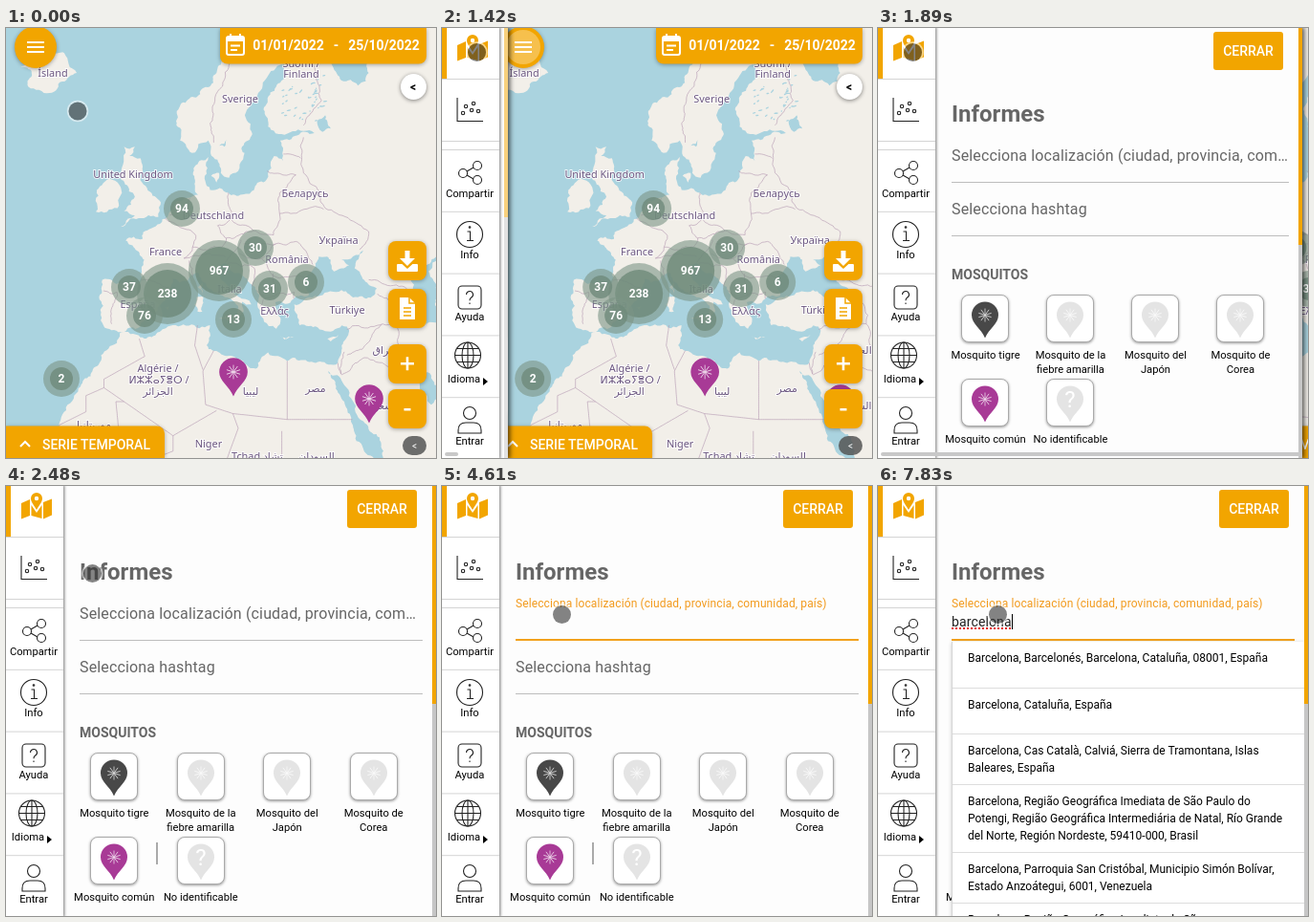
Animation, 450 px wide and 450 px high, one loop 8 s. Source, as an HTML page:

```html
<!DOCTYPE html>
<html lang="es">
<head>
<meta charset="utf-8">
<style>
html, body { margin: 0; width: 100%; height: 100%; overflow: hidden; }
body { position: relative; background: #aad3df; font-family: Roboto, sans-serif; }
div, i, span.abs { position: absolute; box-sizing: border-box; }
svg { display: block; }
svg text { text-anchor: middle; dominant-baseline: central; }
#map, #side svg { position: absolute; left: 0; top: 0; }
.place { font: 10.9px "Noto Sans", "DejaVu Sans", sans-serif; fill: #6b5680; stroke: #fffc; stroke-width: 2px; paint-order: stroke; }
.btn { fill: #f2a500; filter: drop-shadow(0 1px 2px #0005); }
.bold { font-weight: 500; font-size: 14px; fill: #fff; }
.date { font-weight: 700; }
#panel { left: 0; top: 0; height: 450px; overflow: hidden; background: #fdfdfd; color: #666; }
#shade { left: 0; top: 0; height: 450px; box-shadow: 1px 0 5px 1px #000a; }
#side { top: 0; width: 60px; height: 450px; background: #fff; box-shadow: 0 0 3px 1px #0008; }
#side text { font-size: 11.2px; fill: #000; }
#close { top: 4px; width: 73px; height: 40px; border-radius: 3px; background: #f2a500; color: #fff; font: 500 14px/40px Roboto, sans-serif; text-align: center; }
.label { left: 77px; height: 20px; font-size: 16px; line-height: 20px; letter-spacing: .00937em; white-space: nowrap; overflow: hidden; text-overflow: ellipsis; transform-origin: 0 50%; }
.rule { left: 77px; height: 1px; background: #bdbdbd; }
#focus { left: 77px; top: 160px; height: 2px; background: #f2a11c; }
#entry { left: 77px; top: 134px; height: 16px; display: flex; color: #222; font-size: 14px; line-height: 17px; letter-spacing: .12px; }
#caret { position: static; width: 1px; height: 16px; background: #000; }
#grid { left: 68px; top: 279px; display: flex; flex-wrap: wrap; }
.kind { position: static; width: 25%; padding: 0 1.5px 1.6px; font-size: 11.2px; line-height: 15px; text-align: center; color: #000; }
.card { position: static; width: 50px; height: 50px; margin: 0 auto 6px; border: 1px solid #aaa; border-radius: 8px; background: #fff; box-shadow: 0 1px 3px #0006; }
#split { left: 157px; top: 373px; width: 1.5px; height: 23px; background: #aaa; }
#menu { left: 77px; top: 163px; width: 369px; background: #fff; border-left: 1px solid #d5d5d5; box-shadow: 0 1px 4px #0003; }
#menu div { position: static; min-height: 48.6px; padding: 8px 16px; border-bottom: 1px solid #ddd; font-size: 12px; line-height: 18px; color: #000; white-space: pre; }
#track { top: 0; width: 4px; height: 450px; background: #c6c6c6; }
#thumb { width: 4px; background: #f2a500; }
#bar { left: 3px; top: 444px; height: 4px; background: #c8c8c8; border-radius: 2px; }
#cursor { left: -9.5px; top: -9.5px; width: 19px; height: 19px; border-radius: 50%; background: rgba(50, 50, 50, .6); box-shadow: 0 0 0 1.7px #fff8; }
</style>
</head>
<body>
<svg id="map" width="450" height="450"></svg>
<div id="shade"></div>
<div id="panel">
  <span class="abs" style="left:77px;top:76px;font:700 24px/28px Roboto,sans-serif">Informes</span>
  <div id="close">CERRAR</div>
  <div class="label" id="where" style="top:124px">Selecciona localización (ciudad, provincia, comunidad, país)</div>
  <div class="rule" style="top:161px"></div>
  <div id="focus"></div>
  <div id="entry"><span id="typed"></span><i id="caret"></i></div>
  <div class="label" style="top:180px">Selecciona hashtag</div>
  <div class="rule" style="top:217px"></div>
  <span class="abs" style="left:77px;top:249px;font:700 14px/18px Roboto,sans-serif">MOSQUITOS</span>
  <div id="grid"></div>
  <div id="split"></div>
  <div id="menu"></div>
  <div id="track"><div id="thumb"></div></div>
  <div id="side"></div>
  <div id="bar"></div>
</div>
<div id="cursor"></div>
<script>
const $ = id => document.getElementById(id);
let seed = 11;
const rand = () => (seed = seed * 16807 % 2147483647) / 2147483647;

// Mercator: "lon,lat" to stage pixels
const project = p => {
  const [lon, lat] = p.split(',').map(Number);
  return [152 + 5.69 * lon, 538 - 325.95 * Math.log(Math.tan(Math.PI / 4 + lat * Math.PI / 360))];
};
// midpoint displacement turns a few key points into a natural outline
const rough = (a, b, k) => {
  const dx = b[0] - a[0], dy = b[1] - a[1], len = Math.hypot(dx, dy);
  if (len < 3.5) return [b];
  const d = (rand() - .5) * k * Math.min(1, 20 / len);
  const m = [(a[0] + b[0]) / 2 - dy * d, (a[1] + b[1]) / 2 + dx * d];
  return [...rough(a, m, k), ...rough(m, b, k)];
};
const trace = (s, k, closed) => {
  const pts = s.split(' ').map(project);
  const from = closed ? pts : pts.slice(0, -1);
  const out = from.flatMap((p, i) => rough(p, pts[(i + 1) % pts.length], k));
  return 'M' + [pts[0], ...out].map(p => p.map(v => v.toFixed(1)).join(' ')).join('L') + (closed ? 'Z' : '');
};
const areas = list => list.map(s => trace(s, .42, true)).join('');
const borders = list => list.map(s => trace(s, .3)).join('');

const mainland = [
  '14,70 15,68.3 12,65 9,63.3 5,62 5.3,59.2 7.5,58 10.5,59.2 12.8,56 14.3,55.5 16,56.2 16.7,58.6 18.6,59.8 17.2,61.5 21.5,64.8 24.5,65.8 25,64.8 21.4,62.8 22,60.2 30,59.9',
  '23.7,59.2 24.3,57.2 22.6,57.7 21.2,55.3 19,54.4 14.2,53.9 10.8,54.2 9.8,55.4 10.5,57.6 8.2,56.8 8.6,53.7',
  '4.8,53 3,51.2 1.6,50.4 -1.5,49.4 -1.6,48.6 -4.7,48.4 -1.3,46 -1.8,43.4 -9,43.4 -9.3,38.5 -8.8,37 -5.6,36',
  '-2,36.8 0,38.7 3.2,42 4,43.5 6.5,43.2 8.7,44.3 12.3,41.7 15.6,40 15.8,38 17,39 16.7,40.4 18.4,40 14,42.6 12.4,45.2 13.6,45.6 15,44.4 19.4,41.9 19.5,40 21.6,36.9 23,36.5 23.8,38 22.8,40.3 26.2,40.8',
  '28.9,41.2 27.8,43 30.8,46.4 33,46 33.6,44.5 36.4,45.3 35,46 39,47.2 37.4,44.9 41.5,42.2 41,41.3 38,41 35,42 31,41.2 29.2,41 26.3,40',
  '27.3,37 30.6,36.7 32.5,36.1 36,36.8 35,33 34.3,31.3 31,31.5 25,31.6 21.5,32.9 19.5,30.5 15.3,32.2 10.2,34',
  '10.8,37 3,36.8 -2,35.2 -5.8,35.8 -9.7,31 -13,27.5 -17,21 -16.2,14 60,14 60,70'].join(' ');
const britain = '-5.6,50.1 1.3,51.2 1.7,52.6 -.2,54 -2,55.8 -2,57.5 -4,57.7 -3,58.6 -5,58.6 -5.5,56.3 -4.8,54.8 -3,53.5 -5,51.9 -3,51.4';
const ireland = '-6.2,52.2 -5.6,54.5 -7.2,55.3 -10,54.2 -10.2,51.8';
const iceland = '-24,65.5 -22.3,66.4 -20.8,65.8 -16,66.5 -13.7,65 -18.7,63.4 -22.6,63.9 -22,65';
const islands = ['12.5,38 15.6,38.2 15.1,36.7', '8.3,41 9.6,41 9.4,39 8.5,39', '8.6,42.4 9.4,43 9.4,41.5', '23.6,35.4 26.2,35.2 24.5,34.9',
  '32.4,35 34.5,35.6 33,34.6', '11,55.7 12.5,56 12,55', '2.4,39.6 3.4,39.7 3,39.3'];
const waters = ['32.5,30 35.5,25 37.3,20 41,14 43,14 42.7,16.5 39,21.7 35,28.5', '47.5,45 53,46.5 51,44.5 54,37 50.5,37 49.5,40.5',
  '48,30 50,30 55,26.5 51.5,24.5', '33,66.8 35,64.4 38,64 40,65 39.5,66', '30.5,61 32,61.5 33,60.3 31.5,60', '12.5,58.7 14,59.3 13.5,58.6'];
const europe = ['11.5,59 12.2,63.5 16,67.5 18,68.5', '24.3,65.8 23.7,67.8 21,69', '28,60.6 31.3,62.8 29,67', '28,59.5 28,56 31,54 32,52.2 40,49.5 38.3,47.3',
  '21.3,56.2 26.6,55.8 23.6,53.9 23.6,51.6 31.7,52.1', '24.3,57.9 27.5,57.5', '14.2,53.9 14.7,51 18.8,49.6 22.5,49.1 23.6,51.6', '14.7,51 12.2,50.2 13.8,48.7 18.8,49.6',
  '2.5,51.1 8.2,49 7.6,47.6 13,47.6 13.8,48.7', '3.4,51.4 6,50.9 7.1,53.3', '7.6,47.6 6,46.2 10.4,46.8 13.6,46.4', '7,45.9 7.6,43.8', '-1.8,43.3 3.2,42.4', '-8.8,41.9 -6.3,41.7 -7.3,37.2'];
const east = ['13.6,45.7 16.5,48.5', '17,48 22.9,48 20.3,46.2 22.9,43.8 28.6,43.7', '22.9,48 26.6,48.3 29.7,45.4', '16.2,46.8 20.3,46.2', '14,45.5 19,44.9 18.5,42.5',
  '19.4,41.9 20.9,40.9 20,39.7', '20.9,40.9 26.3,41.7 26.2,40.8', '22.4,44.2 23,41.3', '41.6,41.5 44.5,39.7 44.8,37.2 36,36.4', '40,43.4 48,41.8',
  '42.4,37.1 38.8,33.4 36,32.5', '35,29.4 39.2,32.1 47.5,29', '44.8,37.2 45.5,34 48.5,30', '34.3,31.3 34.9,29.5 35.5,33'];
const sahara = ['25,31.6 25,22 37,22', '25,22 15,23 10,24.5 9.5,30 11.5,33.2', '8.5,37 8,34 9.5,30.2', '12,23.5 4,19.2 -5,25 -8.7,27.3 -8.7,28.7 -1.2,32.3 -2.2,35',
  '-5,25 -6.5,25 -5.5,15.5 -12,15', '4,19.2 4,16.5 0,15', '15,23 16,20.5 13.5,14', '24,20 24,15.7 22,13', '-8.7,27.3 -12,26 -12,23.3 -17,21'];

const places = [['Ísland', 49, 48], ['Sverige', 245, 75], ['Suomi /', 309, 38], ['Finland', 309, 49], ['United Kingdom', 133, 154], ['Беларусь', 313, 174],
  ['Deutschland', 217, 197], ['France', 167, 235], ['Україна', 348, 223], ['România', 294, 243], ['Italia', 234, 274], ['España', 138, 290],
  ['Ελλάς', 281, 297], ['Türkiye', 357, 296], ['Algérie /', 159, 357], ['ⵍⵣⵣⴰⵢⴻⵔ /', 160, 369], ['الجزائر', 159, 381], ['ليبيا', 256, 381], ['مصر', 324, 378],
  ['العراق', 398, 338], ['السعودية', 392, 396], ['Niger', 212, 436], ['Tchad تشاد', 263, 449], ['السودان', 325, 449], ['موريتانيا', 92, 416]];
const clusters = [[94, 184, 189], [30, 261, 230], [967, 223, 254], [238, 169, 278], [37, 129, 271], [76, 145, 301], [31, 276, 273], [6, 314, 266], [13, 238, 305], [2, 58, 367]];

const PURPLE = '#a83a96', PALE = '#e4e4e4';
const times = (n, f) => Array.from({ length: n }, (_, i) => f(i)).join('');
const text = (s, x, y, attrs = '') => `<text x="${x}" y="${y}" ${attrs}>${s}</text>`;
const circle = (x, y, r, attrs = '') => `<circle cx="${x}" cy="${y}" r="${r}" ${attrs}/>`;
const bug = `<g stroke="#fff" stroke-width=".8" opacity=".8">${times(5, i => `<path d="M0-7V7" transform="rotate(${36 * i})"/>`)}</g>`;
const pin = (x, y, color, mark = bug, k = 1) => `<g transform="translate(${x} ${y}) scale(${k})">
  <path d="M0 24C-4 14-14 9-14 0A14 14 0 0 1 14 0C14 9 4 14 0 24Z" fill="${color}"/>${mark}</g>`;
const cluster = ([n, x, y]) => {
  const r = n > 200 ? 32 : 19;
  return circle(x, y, r, 'fill="#7c9586" opacity=".6"') + circle(x, y, r - 7, 'fill="#6f8a7a" opacity=".8"')
    + text(n, x, y, 'font-size="12" font-weight="700" fill="#fff"');
};
const square = y => `<rect class="btn" x="400" y="${y}" width="40" height="41" rx="8"/>`;
const lake = () => {
  const [x, y] = project(`${24 + 8 * rand()},${61 + 4 * rand()}`);
  return `<ellipse cx="${x}" cy="${y}" rx="${.6 + 1.8 * rand()}" ry=".7" transform="rotate(${-60 * rand()} ${x} ${y})"/>`;
};

$('map').innerHTML = `
<g id="world">
  <path d="${areas([mainland, britain, ireland, iceland, ...islands])}" fill="#f2efe9"/>
  <g fill="#aad3df"><path d="${areas(waters)}"/>${times(45, lake)}</g>
  <path d="${borders(europe) + borders(east) + sahara.map(s => trace(s, 0)).join('')}" fill="none" stroke="#b79db4" stroke-width=".8" opacity=".8"/>
  ${places.map(([s, x, y]) => text(s, x, y - 1.2, 'class="place"')).join('')}
  ${clusters.map(cluster).join('')}
  ${pin(238, 360, PURPLE, bug, 1.06)}${pin(380, 388, PURPLE, bug, 1.06)}
</g>
<g id="left">
  ${circle(31, 20, 22, 'class="btn"')}${circle(31, 20, 18, 'id="ripple" fill="#fff" opacity=".3"')}
  <path d="M22 15h18M22 20h18M22 25h18" stroke="#fff" stroke-width="2"/>
  <path class="btn" d="M0 416.500H158a8 8 0 0 1 8 8V450H0Z"/>
  <path d="M15 438l5-5 5 5" fill="none" stroke="#fff" stroke-width="2"/>
  ${text('SERIE TEMPORAL', 94.5, 435.5, 'class="bold"')}
</g>
<path class="btn" d="M224 0H440V29.500a8 8 0 0 1-8 8H232a8 8 0 0 1-8-8Z"/>
<g fill="none" stroke="#fff" stroke-width="2"><rect x="231" y="9" width="18" height="19" rx="2"/><path d="M231 12h18" stroke-width="4"/><path d="M235 6v4M245 6v4M235 18.500h10M235 23h7"/></g>
<g class="bold date">${text('01/01/2022', 295.5, 17.8)}${text('-', 345.5, 17.8)}${text('25/10/2022', 395.5, 17.8)}</g>
${circle(426.5, 61.5, 13.5, 'fill="#fff" style="filter:drop-shadow(0 1px 2px #0007)"')}${text('&lt;', 426, 61.5, 'font-size="12" font-weight="700"')}
${[223, 273, 331, 378].map(square).join('')}
<g fill="#fff"><path d="M417.500 233h5v8h5.500l-8 8-8-8h5.500Z"/><path d="M410 247h4.500l5.500 5 5.500-5h4.500q1 0 1 1v6q0 1-1 1h-20q-1 0-1-1v-6q0-1 1-1Z"/>
<path d="M412 282h10l6 6v17h-16Z"/><path d="M416 293h8M416 297h8M416 301h8M422 282v6h6" fill="none" stroke="#f2a500" stroke-width="1.5"/>
<path d="M413 350h14v2.500h-14ZM418.700 344.200h2.600v14h-2.600ZM416.500 398h7v2.500h-7Z"/></g>
<rect x="415" y="427" width="25" height="20" rx="10" fill="#555" opacity=".85"/>${text('&lt;', 427.5, 437.5, 'font-size="10" fill="#fff"')}`;

$('side').innerHTML = `<svg width="60" height="450">
<path d="M0 53.500h60M0 118.500h60${times(5, i => `M0 ${127.5 + 64.8 * i}h60`)}" stroke="#d4d4d4"/>
<g fill="#f2a500"><path d="M0 0h5v53H0ZM16 18l9-4v17l-9 3.500ZM26.500 20l5.500 8 5.500-8v14l-11-3ZM39 17l9-3.500v17l-9 4Z"/><path d="M32 25c-2-4-6-8-6-12a6 6 0 0 1 12 0c0 4-4 8-6 12Z"/></g>${circle(32, 13, 2.2, 'fill="#fff"')}
<g fill="none" stroke="#222" stroke-width="1.100">
<path d="M16 73v24.500h27"/>${circle(22, 89, 1.7)}${circle(25, 82, 1.7)}${circle(31, 86, 1.7)}${circle(33, 79, 1.7)}${circle(38, 87, 1.7)}
<path d="M26 150l7-4M26 154l7 4"/>${circle(22, 152, 4.5)}${circle(37, 144, 4.5)}${circle(37, 159, 4.5)}
${circle(29, 216, 13.5)}<path d="M26.500 213h3v9M26 222.500h7"/>${circle(29, 208.5, .8)}
<rect x="17" y="270" width="24" height="24" rx="4"/><path d="M25.500 279a3.500 3.500 0 1 1 5 3.200q-1.500.8-1.500 3M29 287.500v1.500"/>
${circle(27, 342.5, 13.5)}<ellipse cx="27" cy="342.500" rx="6" ry="13.500"/><path d="M27 329v27M13.500 342.500h27M16 335.500h22M16 349.500h22"/>
${circle(29, 403, 6.5)}<path d="M17 424v-3q0-8 8-8h8q8 0 8 8v3Z"/></g>
<path d="M43 366l5 4-5 4Z"/>
${['Compartir', 'Info', 'Ayuda', 'Idioma', 'Entrar'].map((s, i) => text(s, s === 'Idioma' ? 23 : 29, 173 + 64.8 * i)).join('')}</svg>`;

const query = '<text y="0" font-size="24" fill="#fff">?</text>';
const kinds = [['Mosquito tigre', '#484848'], ['Mosquito de la fiebre amarilla', PALE], ['Mosquito del Japón', PALE], ['Mosquito de Corea', PALE],
  ['Mosquito común', PURPLE], ['No identificable', PALE, query]];
$('grid').innerHTML = kinds.map(([name, color, mark]) =>
  `<div class="kind"><div class="card"><svg width="48" height="48">${pin(24, 20.5, color, mark)}</svg></div>${name}</div>`).join('');

$('menu').innerHTML = ['Barcelona, Barcelonés, Barcelona, Cataluña, 08001, España', 'Barcelona, Cataluña, España',
  'Barcelona, Cas Català, Calviá, Sierra de Tramontana, Islas\nBaleares, España',
  'Barcelona, Região Geográfica Imediata de São Paulo do\nPotengi, Região Geográfica Intermediária de Natal, Río Grande\ndel Norte, Región Nordeste, 59410-000, Brasil',
  'Barcelona, Parroquia San Cristóbal, Municipio Simón Bolívar,\nEstado Anzoátegui, 6001, Venezuela',
  'Barcelona, Região Geográfica Imediata de São'].map(s => `<div>${s}</div>`).join('');

const LOOP = 8000, TICK = 118.2, WORD = 'barcelona';
const clamp = u => Math.min(1, Math.max(0, u));
const ease = u => (u = clamp(u), u * u * (3 - 2 * u));
const mix = (a, b, u) => a + (b - a) * u;
const px = (el, prop, v) => { el.style[prop] = v + 'px'; };
const show = (id, on) => { $(id).style.visibility = on ? 'inherit' : 'hidden'; };
// tick of each key press: steady, a little late mid-word
const keys = [...WORD].map((_, i) => 40 + 2 * i + Math.round(1.55 * Math.sin(Math.PI * i / 8)));

function placeCursor(k) {
  const a = ease((k - 2) / 7), b = ease((k - 17) / 7);
  const x = mix(mix(74.5, 36, a), 125, b), y = mix(mix(86.5, 25, a), 134, b);
  $('cursor').style.transform = `translate(${x}px, ${y}px)`;
}

function openPanel(k) {
  const w = 450 * ease((k - 10.55) / 5.85), field = Math.max(0, w - 91);
  $('world').setAttribute('transform', `translate(${1.08 * w ** .835})`);
  $('left').setAttribute('transform', `translate(${.78 * w})`);
  $('ripple').style.display = w ? '' : 'none';
  $('panel').style.visibility = $('shade').style.visibility = w ? 'visible' : 'hidden';
  px($('panel'), 'width', w);
  px($('shade'), 'width', w);
  px($('side'), 'left', Math.min(0, w - 60));
  px($('close'), 'left', w - 93);
  document.querySelectorAll('.label, .rule, #focus').forEach(el => px(el, 'width', field));
  px($('grid'), 'width', Math.max(204, w - 88));
  px($('track'), 'left', w - 4);
  $('track').style.opacity = clamp((k - 10) / 4);
  px($('thumb'), 'height', 197 + 31 * (w / 450) ** 2);
  px($('bar'), 'width', Math.max(0, 1.15 * (w - 57)));
  show('bar', w < 450);
  show('split', w === 450);
  return field;
}

function fillField(k, field) {
  const f = ease((k - 24) / 4), where = $('where');
  where.style.transform = `translateY(${-11 * f}px) scale(${1 - f / 4})`;
  where.style.color = f ? '#f29a1c' : '';
  if (f) px(where, 'width', field * 4 / 3);
  $('focus').style.transform = `scaleX(${f})`;

  const pressed = keys.filter(n => n <= k), since = pressed.at(-1) || 27;
  $('typed').textContent = WORD.slice(0, pressed.length);
  $('typed').style.textDecoration = k >= 62 ? 'underline dotted #e02020 2px' : 'none';
  show('caret', k >= 25 && Math.floor(Math.max(0, k - since) / 4) % 2 === 0);
  $('menu').style.opacity = clamp((k - 61) / 3);
}

function render(k) {
  placeCursor(k);
  fillField(k, openPanel(k));
}

let last = -1;
const start = performance.now();
function loop() {
  const k = Math.floor((performance.now() - start) % LOOP / TICK + .1);
  if (k !== last) render(last = k);
  requestAnimationFrame(loop);
}
loop();
</script>
</body>
</html>
```
